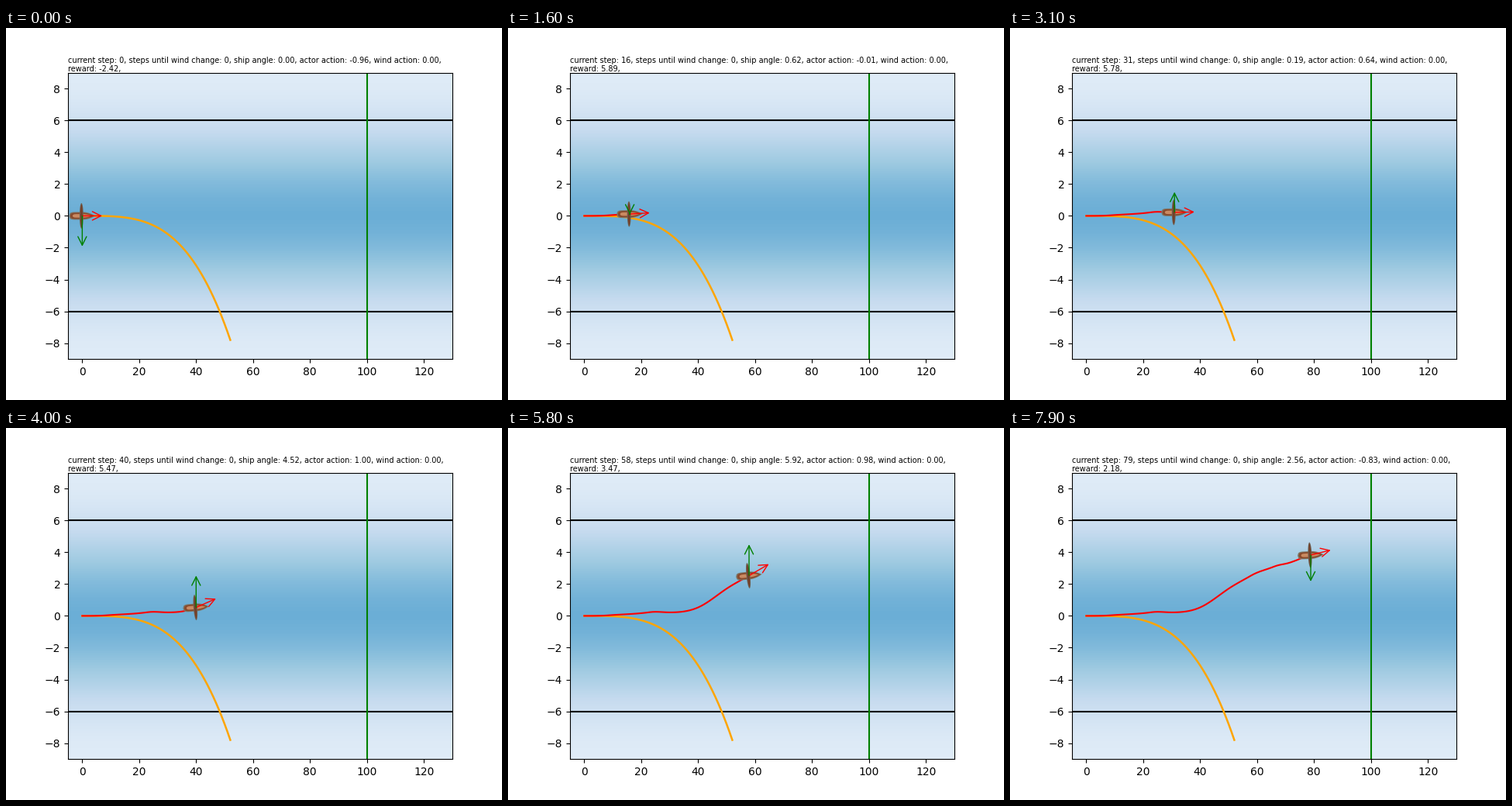
A matplotlib script for the animation above (8 s loop, 640x480 px).

```python
import numpy as np
import matplotlib.pyplot as plt
from matplotlib.animation import FuncAnimation
from matplotlib.patches import Ellipse, FancyArrowPatch, Polygon
from matplotlib.transforms import Affine2D, ScaledTranslation

STEPS, INTERVAL = 80, 100

# step, lateral position, heading in degrees, rudder action
KEYS = np.array([
    (0, 0, 0, -.96), (9, .04, .76, -.28), (23, .23, 1.43, .26),
    (30, .22, 0, .6), (40, .53, 4.52, 1), (50, 1.7, 6.8, -.5),
    (58, 2.53, 5.92, .98), (66, 3.09, 4.16, .95), (70, 3.27, 2, -.6),
    (79, 3.82, 2.56, -.83),
])


def hermite(t, tk, yk, mk):
    """Cubic Hermite curve and its slope through the given knots."""
    i = np.clip(np.searchsorted(tk, t, side="right") - 1, 0, len(tk) - 2)
    h = tk[i + 1] - tk[i]
    s = (t - tk[i]) / h
    d = yk[i + 1] - yk[i]
    a, b = h * mk[i] - d, d - h * mk[i + 1]
    y = yk[i] + s * d + s * (1 - s) * ((1 - s) * a + s * b)
    slope = (d + (1 - 2 * s) * (a * (1 - s) + b * s) + s * (1 - s) * (b - a)) / h
    return y, slope


steps = np.arange(STEPS)
tk, yk, ak, uk = KEYS.T
ys, slopes = hermite(steps, tk, yk, np.tan(np.radians(ak)))
angles = np.degrees(np.arctan(slopes))
actions = np.interp(steps, tk, uk)
xs = np.append(0, np.cumsum(np.cos(np.radians(angles[:-1]))))
rewards = 6 - np.abs(ys)
rewards[0] = -2.42

fig, ax = plt.subplots(figsize=(6.4, 4.8), dpi=100)

# River: deep in the middle, shallow at the banks
depth = np.abs(np.linspace(9, -9, 370))
water = .31 + .19 * np.cos(np.pi * (depth + .3) / 9.3)
ax.imshow(water[:, None], cmap="Blues", vmin=0, vmax=1, aspect="auto",
          extent=(-5, 130, -9, 9), zorder=0)
for bank in (-6, 6):
    ax.axhline(bank, color="black")
ax.axvline(100, color="green")

drift = np.arange(53)
ax.plot(drift, -7.8 * (drift / 52) ** 3.5, color="orange", lw=1.8)
trail, = ax.plot([], [], color="red")
ax.set(xlim=(-5, 130), ylim=(-9, 9))
info = ax.text(-5, 9, "", fontsize=7, va="bottom", linespacing=1.1)


def hull(length, width, color):
    """Blunt stern on the left, pointed bow on the right, in pixels."""
    s = np.linspace(-1, 1, 41)
    half = width / 2 * np.sqrt(1 - s ** 8) * (1 - np.maximum(s, 0) ** 2)
    x = np.append(s, s[::-1]) * length / 2
    return Polygon(np.column_stack([x, np.append(half, -half[::-1])]), fc=color)


def sail(width, height, color):
    return Ellipse((-1, 0), width, height, fc=color)


ship = [
    hull(34, 10, "#7d7768"), hull(31, 8, "#8a4a2c"), hull(25, 4.5, "#c98a62"),
    sail(5, 33, "#6e6456"), sail(3, 30, "#74402a"),
]
for p in ship:
    p.set(lw=0, zorder=3)
    ax.add_patch(p)


def arrow(color):
    return ax.add_patch(FancyArrowPatch(
        (0, 0), (1, 1), arrowstyle="->", mutation_scale=20, color=color,
        lw=1, shrinkA=0, shrinkB=0, zorder=4))


heading, rudder = arrow("red"), arrow("green")


def update(i):
    x, y, angle, action = xs[i], ys[i], angles[i], actions[i]
    trail.set_data(xs[:i + 1], ys[:i + 1])
    place = (Affine2D().rotate_deg(angle).scale(.01) + fig.dpi_scale_trans
             + ScaledTranslation(x, y, ax.transData))
    for p in ship:
        p.set_transform(place)
    a = np.radians(angle)
    heading.set_positions((x, y), (x + 7 * np.cos(a), y + 7 * np.sin(a)))
    rudder.set_positions((x, y), (x, y + 2 * action))
    info.set_text(
        f"current step: {i}, steps until wind change: 0, "
        f"ship angle: {angle:.2f}, actor action: {action:.2f}, "
        f"wind action: 0.00,\nreward: {rewards[i]:.2f},")
    return [trail, heading, rudder, info, *ship]


anim = FuncAnimation(fig, update, frames=STEPS, interval=INTERVAL,
                     repeat=True, repeat_delay=0, blit=False)
plt.show()
```
